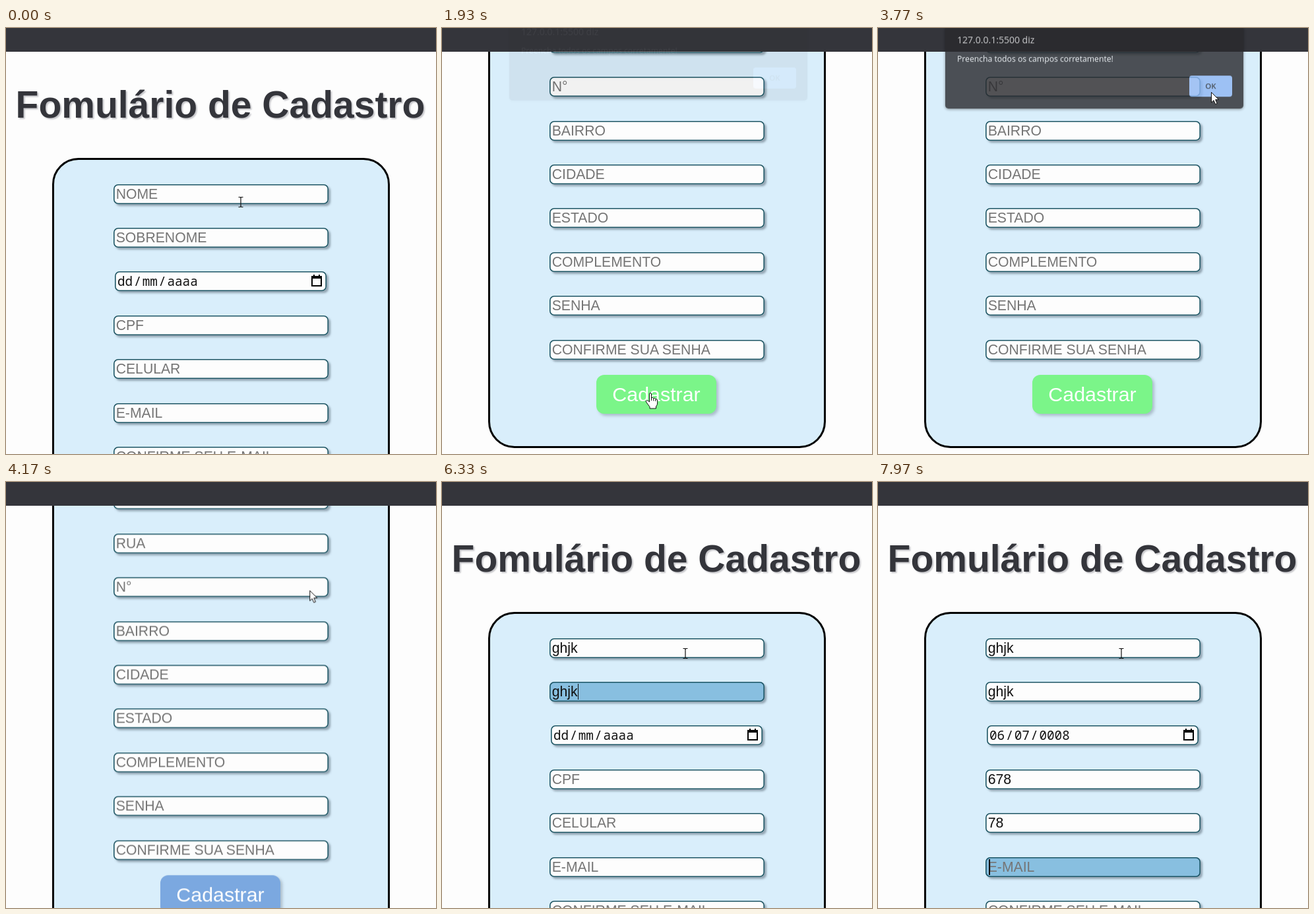
An HTML page that plays this animation: 652 by 646 pixels, repeating every 8000 ms.

```html
<!DOCTYPE html>
<html lang="pt-BR">
<head>
<meta charset="utf-8">
<title>Formulário</title>
<style>
  html, body { margin: 0; width: 100%; height: 100%; overflow: hidden; background: #fdfdfd; }
  body { position: relative; font-family: "Liberation Sans", Arial, sans-serif; }
  body * { box-sizing: border-box; }
  #page, #card, .field, #send, header, h1, #dialog, #dialog p, #ok, #cursor, #cursor svg { position: absolute; }

  /* every animation shares one 8 s clock: 1% = 80 ms */
  #page, #send, #dialog, #cursor { animation: 8s linear infinite; }
  #cursor svg { animation: 8s step-end infinite; }

  header { left: 0; top: 0; width: 652px; height: 36px; background: #34353b; }
  #page { left: 0; top: 0; width: 652px; height: 1450px; animation-name: scroll; }
  h1 { margin: 0; left: 14.6px; top: 84px; font-size: 57px; line-height: 64px; white-space: nowrap;
       color: #34353b; text-shadow: 2px 2px 2px #c4c4c8; }
  #card { left: 70px; top: 197px; width: 512px; height: 1200px; border: 3px solid #000;
          border-radius: 40px; background: #d9eefb; }
  .field { left: 163px; width: 326px; height: 30px; padding-left: 3.7px; border-radius: 7px;
           font-size: 21.2px; line-height: 30px; white-space: pre; color: #111; background: #fdfdfd;
           box-shadow: inset 0 0 0 1.6px #1c5564, 3px 3px 3px rgba(80, 95, 110, .5); }
  .field.empty { color: #757575; }
  .field.focus { background: #88bfe0; }
  .field.focus::after { content: ""; position: absolute; width: 1.5px; height: 24px;
                        margin-top: 3px; background: #111; }
  .field.focus.empty::after { left: 5px; }
  .field.date { left: 165px; width: 321px; padding-left: 2.5px;
                font: 19.3px/30px "Noto Sans Mono", "DejaVu Sans Mono", monospace; }
  .field.date::after { display: none; }
  .field.date span { padding: 0 1.5px; }
  .field.date svg { position: absolute; left: 297px; top: 5px; }
  #send { left: 234px; top: 1286px; width: 182px; height: 59px; border-radius: 12px; font-size: 30.4px;
          line-height: 59px; text-align: center; color: #fff; background: #7ba8e0;
          box-shadow: 3px 3px 4px rgba(80, 95, 110, .35); animation-name: hover; }

  #dialog { left: 102px; top: 0; width: 452px; height: 123px; border-radius: 0 0 5px 5px; background: #292a2d;
            box-shadow: 0 1px 4px rgba(0, 0, 0, .5); font-family: "Open Sans", "Noto Sans", sans-serif;
            color: #f0f0f2; white-space: nowrap; animation-name: dialog; }
  #dialog p { margin: 0; left: 18px; line-height: 20px; }
  #ok { left: 370px; top: 73px; width: 65px; height: 32px; border-radius: 4px; background: #8fb6f2;
        color: #2a3038; font-size: 11.5px; font-weight: 600; line-height: 32px; text-align: center; }

  #cursor { left: 0; top: 0; animation-name: move; }
  #cursor svg { left: 0; top: 0; overflow: visible; }
  #cursor #beam { animation-name: beam; }
  #cursor #hand { animation-name: hand; }
  #cursor #arrow { animation-name: arrow; }

  @keyframes scroll {
    0%, .4% { transform: translateY(0); animation-timing-function: cubic-bezier(.35, .1, .4, 1); }
    8.9%, 11.4% { transform: translateY(-762px); }
    11.5%, 51% { transform: translateY(-760px); animation-timing-function: cubic-bezier(.4, .05, .4, 1); }
    57.6%, 100% { transform: translateY(0); }
  }
  @keyframes hover {
    0%, 18% { background: #7ba8e0; }
    18.8%, 48.7% { background: #7bf589; }
    49.5%, 100% { background: #7ba8e0; }
  }
  @keyframes dialog {
    0%, 24% { opacity: 0; transform: translateY(-14px); }
    26.5%, 46.7% { opacity: 1; transform: none; }
    49%, 100% { opacity: 0; transform: translateY(-4px); }
  }
  @keyframes move {
    0%, 12.5% { transform: translate(356px, 264px); animation-timing-function: ease-in-out; }
    19.5%, 32% { transform: translate(316px, 554px); animation-timing-function: ease-in-out; }
    41.2%, 49.4% { transform: translate(505px, 97px); animation-timing-function: ease-in-out; }
    55.6%, 63% { transform: translate(393px, 265px); animation-timing-function: ease-in-out; }
    66.8%, 100% { transform: translate(369px, 260px); }
  }
  @keyframes beam { 0% { opacity: 1; } 18% { opacity: 0; } 63.4% { opacity: 1; } 100% { opacity: 1; } }
  @keyframes hand { 0% { opacity: 0; } 18% { opacity: 1; } 32.2% { opacity: 0; } 100% { opacity: 0; } }
  @keyframes arrow { 0% { opacity: 0; } 32.2% { opacity: 1; } 63.4% { opacity: 0; } 100% { opacity: 0; } }
</style>
</head>
<body>
<div id="page">
  <h1>Fomulário de Cadastro</h1>
  <div id="card"></div>
  <div id="send">Cadastrar</div>
</div>
<header></header>
<div id="dialog">
  <p style="top:9px;font-size:14px">127.0.0.1:5500 diz</p>
  <p style="top:38px;font-size:12.2px">Preencha todos os campos corretamente!</p>
  <div id="ok">OK</div>
</div>
<div id="cursor">
  <svg id="beam" width="1" height="1"><path d="M-3.5-7.5H-1L0-6.5 1-7.5H3.5M0-6.5V6.5M-3.5 7.5H-1L0 6.5 1 7.5H3.5" fill="none" stroke="#111" stroke-width="1.2"/></svg>
  <svg id="arrow" width="1" height="1"><path d="M.5.5V16L4 12.7 6.6 18.6 9.2 17.5 6.7 11.7H11.6Z" fill="#fff" stroke="#111"/></svg>
  <svg id="hand" width="1" height="1"><path d="M-1.5 13V1Q-1.5-.5 0-.5T1.5 1V7Q4 5.5 4.7 7.6 7 6.4 7.8 8.6 10.6 8 10.6 11V15Q10.6 18 8.5 20V23H-1V20.5L-6.5 13Q-7.3 11.2-5.6 10.6-4 10.2-1.5 13ZM1.5 7V11M4.7 8V11.5M7.8 9V12" fill="#fff" stroke="#111" stroke-linejoin="round"/></svg>
</div>
<script>
  const LOOP = 8000, KEY_DELAY = 150;
  const labels = ["NOME", "SOBRENOME", "dd/mm/aaaa", "CPF", "CELULAR", "E-MAIL", "CONFIRME SEU E-MAIL", "CEP", "RUA",
    "N°", "BAIRRO", "CIDADE", "ESTADO", "COMPLEMENTO", "SENHA", "CONFIRME SUA SENHA"];
  const DATE = 2;
  const calendar = `<svg width="18" height="19" fill="none" stroke="#000" stroke-width="2">
    <path d="M2 3H16V17H2ZM2 5H16M5 0V3M13 0V3"/></svg>`;
  const page = document.getElementById("page");

  const fields = labels.map((label, i) => {
    const el = document.createElement("div");
    el.style.top = 236.6 + 66.4 * i + "px";
    page.append(el);
    return el;
  });

  const prefixes = text => [...text].map((_, i) => text.slice(0, i + 1));
  // focus time, successive values, time per key
  const visits = [
    [5400, prefixes("ghjk"), 70],
    [5950, prefixes("ghjk"), 70],
    [6500, ["00/mm/aaaa", "06/mm/aaaa", "06/00/aaaa", "06/07/aaaa", "06/07/0008"], 110],
    [7250, prefixes("678"), 70],
    [7600, prefixes("78"), 70],
    [7880, [], 70]
  ];

  function valueAt(visit, t) {
    if (!visit) return "";
    const [start, values, pace] = visit;
    const keys = Math.floor((t - start - KEY_DELAY) / pace) + 1;
    return values[Math.min(keys, values.length) - 1] || "";
  }

  function show(el, i, value, focused) {
    const state = value + focused;
    if (el.dataset.state === state) return;
    el.dataset.state = state;
    const text = value || labels[i];
    el.className = "field" + (i === DATE ? " date" : value ? "" : " empty") + (focused ? " focus" : "");
    if (i === DATE) el.innerHTML = text.split("/").map(part => `<span>${part}</span>`).join("/") + calendar;
    else el.textContent = text;
  }

  const clock = page.getAnimations()[0];
  function frame() {
    const t = (clock.currentTime || 0) % LOOP;
    const active = visits.filter(([start]) => start <= t).length - 1;
    fields.forEach((el, i) => show(el, i, valueAt(visits[i], t), i === active));
    requestAnimationFrame(frame);
  }
  frame();
</script>
</body>
</html>
```
